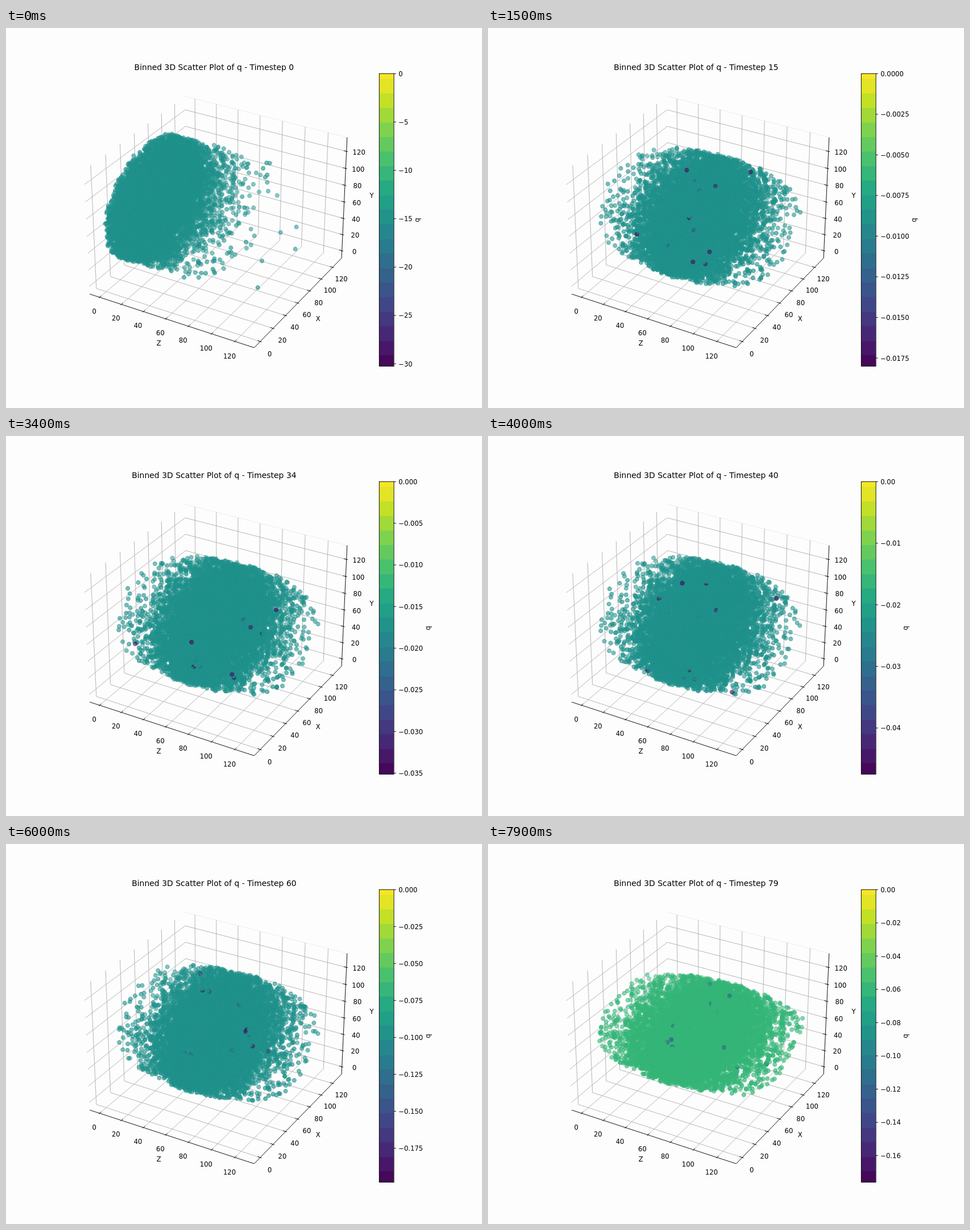
These frames come from a looping animation (837 by 669 pixels, 8 s). An HTML page with a canvas:

```html
<!DOCTYPE html>
<html lang="en">
<head>
<meta charset="utf-8">
<title>Binned 3D Scatter Plot</title>
<style>
html, body { margin: 0; width: 100%; height: 100%; overflow: hidden; background: #fdfdfd; }
canvas { display: block; }
</style>
</head>
<body>
<canvas id="stage" width="837" height="669"></canvas>
<script>
const ctx = document.getElementById('stage').getContext('2d');
const FONT = '"DejaVu Sans", Verdana, sans-serif';
const STEPS = 80, STEP_MS = 100, LINE = 0.93;
const BAR = { x: 656, y: 80.3, w: 25.8, h: 515.1 };
const VIRIDIS = ['440154', '482475', '414487', '355f8d', '2a788e', '21918c',
  '22a884', '44bf70', '7ad151', 'bddf26', 'fde725'];

const clamp = (v, lo, hi) => Math.min(hi, Math.max(lo, v));

function ease(a, b, t) {
  const f = clamp((t - a) / (b - a), 0, 1);
  return f * f * (3 - 2 * f);
}

function viridis(f) {
  const p = clamp(f, 0, 1) * 10, i = Math.min(9, Math.floor(p));
  const part = (hex, k) => parseInt(hex.substr(k * 2, 2), 16);
  const rgb = [0, 1, 2].map(k => {
    const a = part(VIRIDIS[i], k), b = part(VIRIDIS[i + 1], k);
    return Math.round(a + (b - a) * (p - i));
  });
  return `rgb(${rgb})`;
}

function random(seed) {
  let s = seed >>> 0;
  return () => {
    s = (s + 0x6d2b79f5) >>> 0;
    let v = Math.imul(s ^ (s >>> 15), 1 | s);
    v = (v + Math.imul(v ^ (v >>> 7), 61 | v)) ^ v;
    return ((v ^ (v >>> 14)) >>> 0) / 4294967296;
  };
}

function line(a, b, color) {
  ctx.strokeStyle = color;
  ctx.lineWidth = LINE;
  ctx.beginPath();
  ctx.moveTo(a[0], a[1]);
  ctx.lineTo(b[0], b[1]);
  ctx.stroke();
}

function text(s, x, y, align = 'center', size = 11.62) {
  ctx.font = `${size}px ${FONT}`;
  ctx.textAlign = align;
  ctx.fillStyle = '#000';
  ctx.fillText(s, x, y + size * 0.38);
}

// ---- perspective axes: elevation 30, azimuth -60 ----
const HALF = [0.5952, 0.5952, 0.4464];
const LOW = -9.26, SPAN = 145.52;
const world = (v, axis) => ((v - LOW) / SPAN * 2 - 1) * HALF[axis];

function project([x, y, z]) {
  const u = 0.866 * x + 0.5 * y;
  const v = -0.25 * x + 0.433 * y + 0.866 * z;
  const depth = 10 - (0.433 * x - 0.75 * y + 0.5 * z);
  return [372.7 + 2784 * u / depth, 330.9 - 2784 * v / depth, depth];
}

function drawAxes() {
  const [hx, hy, hz] = HALF;
  const seg = (a, b, color) => line(project(a), project(b), color);
  const grid = '#b0b0b0', black = '#000';
  const inner = 0.019, outer = 0.0095, gap = 0.066;
  seg([-hx, hy, hz], [hx, hy, hz], '#ebebeb');
  for (let t = 0; t <= 120; t += 20) {
    const x = world(t, 0), y = world(t, 1), z = world(t, 2);
    seg([x, -hy, -hz], [x, hy, -hz], grid);
    seg([x, hy, -hz], [x, hy, hz], grid);
    seg([-hx, y, -hz], [hx, y, -hz], grid);
    seg([-hx, y, -hz], [-hx, y, hz], grid);
    seg([-hx, hy, z], [hx, hy, z], grid);
    seg([-hx, hy, z], [-hx, -hy, z], grid);

    seg([x, -hy + inner, -hz], [x, -hy - outer, -hz], black);
    seg([hx - inner, y, -hz], [hx + outer, y, -hz], black);
    seg([hx - inner, hy, z], [hx + outer, hy, z], black);
    const [zx, zy] = project([x, -hy - gap, -hz - gap]);
    const [xx, xy] = project([hx + gap, y, -hz - gap]);
    const [yx, yy] = project([hx, hy, z]);
    text(t, zx, zy);
    text(t, xx, xy);
    text(t, yx + 22, yy + 1);
  }
  seg([-hx, -hy, -hz], [hx, -hy, -hz], black);
  seg([hx, -hy, -hz], [hx, hy, -hz], black);
  seg([hx, hy, -hz], [hx, hy, hz], black);
  text('Z', 268.7, 554.5);
  text('X', 548.7, 511.7);
  text('Y', 643, 294.6);
}

// ---- colour bar: [step, lowest value], geometric in between ----
const RANGE = [[0, 30.25], [1, 0.006], [15, 0.018], [26, 0.0235], [40, 0.0475],
  [60, 0.198], [71, 0.15], [79, 0.176]];

function rangeAt(step) {
  const i = Math.max(1, RANGE.findIndex(k => k[0] >= step));
  const [s0, v0] = RANGE[i - 1], [s1, v1] = RANGE[i];
  return v0 * Math.pow(v1 / v0, (step - s0) / (s1 - s0));
}

function tickSize(range) {
  for (let e = -4; e < 3; e++)
    for (const m of [1, 2, 2.5, 5])
      if (range / (m * 10 ** e) <= 8.9) return m * 10 ** e;
}

function drawBar(step) {
  const bottom = BAR.y + BAR.h;
  for (let top = BAR.y, next = 89.5; top < bottom; top = next, next = Math.min(bottom, next + 25.6)) {
    ctx.fillStyle = viridis((bottom - (top + next) / 2) / BAR.h);
    ctx.fillRect(BAR.x, top, BAR.w, Math.min(next - top + 0.5, bottom - top));
  }
  ctx.strokeStyle = '#000';
  ctx.lineWidth = LINE;
  ctx.strokeRect(BAR.x + 0.3, BAR.y, BAR.w, BAR.h);

  const range = rangeAt(step), size = tickSize(range), right = BAR.x + BAR.w;
  let digits = 0, widest = 0;
  while (Math.abs(size * 10 ** digits - Math.round(size * 10 ** digits)) > 1e-6) digits++;
  for (let k = 0; k * size <= range; k++) {
    const y = BAR.y + k * size / range * BAR.h;
    const label = (k ? '\u2212' : '') + (k * size).toFixed(digits);
    line([right, y], [right + 4.1, y], '#000');
    text(label, 690.2, y, 'left');
    widest = Math.max(widest, ctx.measureText(label).width);
  }
  ctx.save();
  ctx.translate(690.2 + widest + 8.3, 338);
  ctx.rotate(-Math.PI / 2);
  text('q', 0, 0);
  ctx.restore();
}

// ---- cloud: a disc in X-Y, spread along Z ----
const COUNT = 9500, MID = 63.5;
const rnd = random(41);
const dots = Array.from({ length: COUNT }, () => {
  const rank = 0.0002 + rnd() * 0.9996;
  return {
    thin: Math.min(126, -14 * Math.log(1 - rank)),
    wide: Math.log(rank / (1 - rank)),
    radius: MID * Math.sqrt(rnd()),
    angle: rnd() * 2 * Math.PI,
    phase: rnd() * 2 * Math.PI
  };
});

// translucent marker whose rim overlaps its face
function marker(color) {
  const c = document.createElement('canvas'), g = c.getContext('2d');
  c.width = c.height = 20;
  g.scale(2, 2);
  g.globalAlpha = 0.72;
  g.fillStyle = g.strokeStyle = color;
  g.lineWidth = 1.16;
  g.arc(5, 5, 3.5, 0, 2 * Math.PI);
  g.fill();
  g.stroke();
  return c;
}
const TEAL = [marker(viridis(0.5)), marker(viridis(0.03))];
const GREEN = [marker(viridis(0.66)), marker(viridis(0.3))];

// drift from the thin layer to the middle, later flatten in Y
function place(p, step) {
  const spread = ease(0, 10, step), flat = ease(57, 71, step);
  const away = (12 + 2 * flat) * p.wide;
  const z = clamp(p.thin + (MID + away - p.thin) * spread, 0, 127);
  const taper = 1 - spread * (0.04 * (1 - flat) + 0.2 * ((z - MID) / MID) ** 2);
  const angle = p.angle + 0.08 * spread * Math.sin(step / 12 + p.phase);
  const r = p.radius * taper;
  return project([
    world(z, 0),
    world(MID + r * Math.cos(angle), 1),
    world(MID + r * Math.sin(angle) * (1 - 0.32 * flat), 2)
  ]);
}

function drawCloud(step) {
  const [plain, low] = step < 76 ? TEAL : GREEN;
  const pick = random(step * 977 + 5);
  const lows = new Set();
  // low values lie near the top of the pile, partly covered
  if (step) for (let k = 0; k < 12; k++) lows.add(COUNT - 1 - Math.floor(pick() * 1500));
  dots.forEach((p, i) => {
    const [x, y, depth] = place(p, step);
    ctx.globalAlpha = clamp(1 - 0.35 * (depth - 9.5), 0.65, 1);
    ctx.drawImage(lows.has(i) ? low : plain, x - 5, y - 5, 10, 10);
  });
  ctx.globalAlpha = 1;
}

function draw(step) {
  ctx.fillStyle = '#fdfdfd';
  ctx.fillRect(0, 0, 837, 669);
  drawAxes();
  drawCloud(step);
  drawBar(step);
  text('Binned 3D Scatter Plot of q - Timestep ' + step, 365.9, 68.8, 'center', 13.95);
}

let shown = -1;
function tick() {
  const step = Math.floor(performance.now() / STEP_MS) % STEPS;
  if (step !== shown) draw(shown = step);
  requestAnimationFrame(tick);
}
tick();
</script>
</body>
</html>
```
